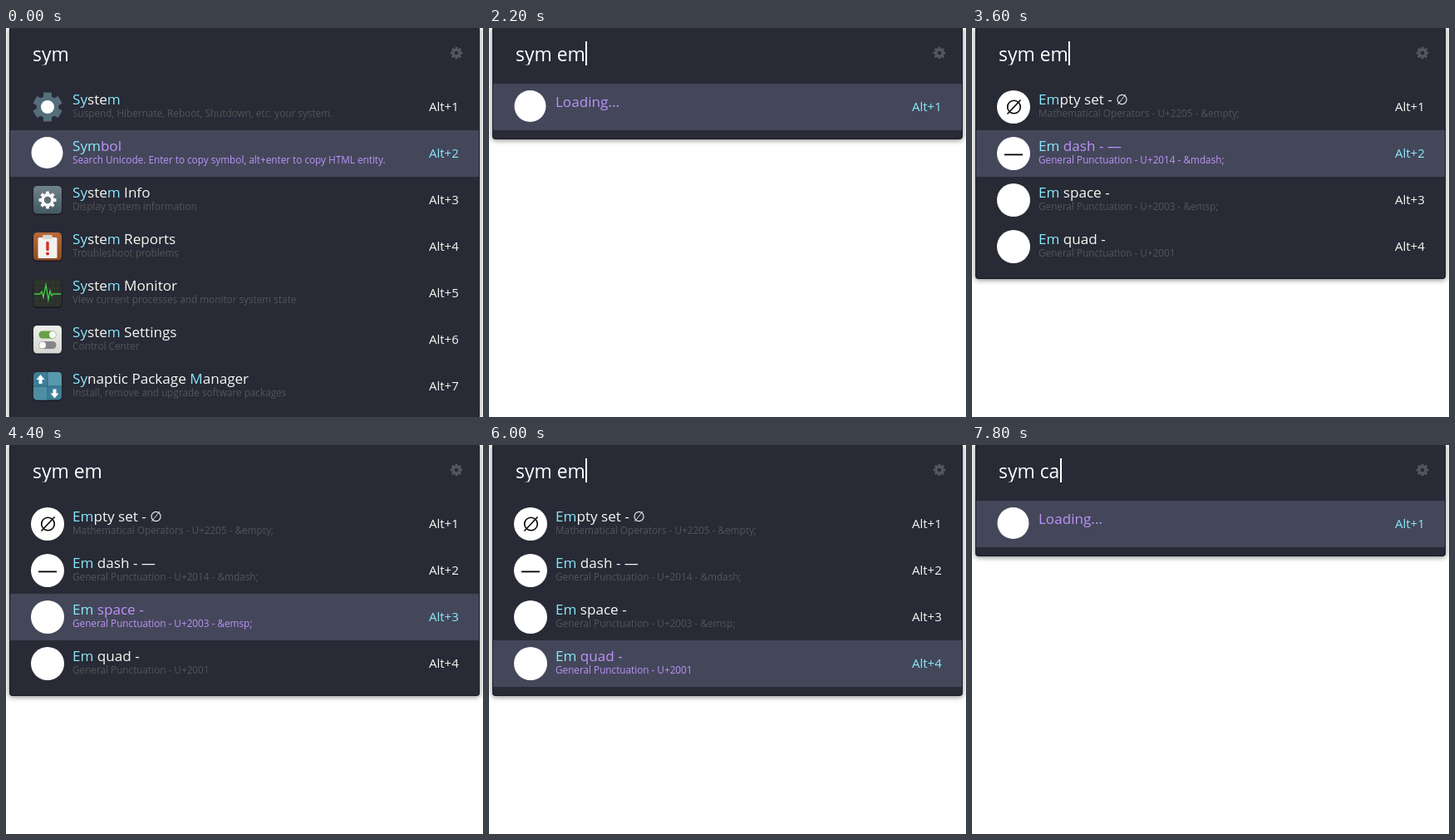
An HTML page with a canvas for the animation above (8 s loop, 574 by 468 pixels).

```html
<!DOCTYPE html>
<html lang="en">
<head>
<meta charset="utf-8">
<title>Launcher search</title>
<style>
  html, body { margin: 0; width: 100%; height: 100%; overflow: hidden; background: #fff; }
  canvas { display: block; }
</style>
</head>
<body>
<canvas id="stage" width="574" height="468"></canvas>
<script>
const ctx = document.getElementById('stage').getContext('2d');
const LOOP = 8000, ROW = 56, TOP = 67;
const FONT = '"Open Sans", "Noto Sans", "DejaVu Sans", sans-serif';
const COLOR = {
  panel: '#282a36', active: '#44475a', edge: '#191a22', text: '#f8f8f2',
  match: '#8be9fd', accent: '#bd93f9', dim: '#555556'
};

// Each track is a list of [start, value]; the last started value holds.
const query = [[0, 'sym'], [1500, 'sym '], [1800, 'sym e'], [1900, 'sym em'],
  [7100, 'sym e'], [7400, 'sym '], [7700, 'sym c'], [7800, 'sym ca']];
const caret = [[0, 0], [300, 1], [1100, 0], [1500, 1], [3200, 0], [3600, 1],
  [4400, 0], [4800, 1], [5600, 0], [6000, 1], [6800, 0], [7100, 1]];
const view = [[0, 'apps'], [2200, 'loading'], [2700, 'symbols'], [7700, 'loading']];
const selected = [[0, 1], [2200, 0], [3500, 1], [4400, 2], [5300, 3], [7700, 0]];
const caretX = { 'sym': 75, 'sym ': 81, 'sym e': 95, 'sym em': 116, 'sym c': 94, 'sym ca': 106 };

// Square brackets mark the matched letters.
const lists = {
  apps: [
    ['[Sy]ste[m]', 'Suspend, Hibernate, Reboot, Shutdown, etc. your system.', hexIcon],
    ['[Sym]bol', 'Search Unicode. Enter to copy symbol, alt+enter to copy HTML entity.', discIcon],
    ['[Sy]ste[m] Info', 'Display system information', infoIcon],
    ['[Sy]ste[m] Reports', 'Troubleshoot problems', reportIcon],
    ['[Sy]ste[m] Monitor', 'View current processes and monitor system state', monitorIcon],
    ['[Sy]ste[m] Settings', 'Control Center', settingsIcon],
    ['[Sy]naptic Package [M]anager', 'Install, remove and upgrade software packages', packageIcon]
  ],
  loading: [['Loading...', '', discIcon]],
  symbols: [
    ['[Em]pty set - ∅', 'Mathematical Operators - U+2205 - &empty;', emptySetIcon],
    ['[Em] dash - —', 'General Punctuation - U+2014 - &mdash;', dashIcon],
    ['[Em] space - \u2003', 'General Punctuation - U+2003 - &emsp;', blankIcon],
    ['[Em] quad - \u2001', 'General Punctuation - U+2001', blankIcon]
  ]
};

function at(track, t) {
  let value = track[0][1];
  for (const [start, v] of track) if (t >= start) value = v;
  return value;
}

function text(str, x, y, size, color) {
  ctx.font = `${size}px ${FONT}`;
  ctx.fillStyle = color;
  ctx.fillText(str, x, y);
  return x + ctx.measureText(str).width;
}

function rect(x, y, w, h, color, r = 0) {
  ctx.fillStyle = color;
  ctx.beginPath();
  ctx.roundRect(x, y, w, h, r);
  ctx.fill();
}

function disc(x, y, r, color) {
  ctx.fillStyle = color;
  ctx.beginPath();
  ctx.arc(x, y, r, 0, Math.PI * 2);
  ctx.fill();
}

function line(points, color, width) {
  ctx.strokeStyle = color;
  ctx.lineWidth = width;
  ctx.beginPath();
  points.forEach(([x, y]) => ctx.lineTo(x, y));
  ctx.stroke();
}

function fade(y0, y1, a, b) {
  const g = ctx.createLinearGradient(0, y0, 0, y1);
  g.addColorStop(0, a);
  g.addColorStop(1, b);
  return g;
}

function gear(x, y, r, teeth, width, color, hole, holeColor) {
  ctx.save();
  ctx.translate(x, y);
  disc(0, 0, r * 0.76, color);
  for (let i = 0; i < teeth; i++) {
    rect(-width / 2, -r, width, r, color, 0.8);
    ctx.rotate(Math.PI * 2 / teeth);
  }
  disc(0, 0, hole, holeColor);
  ctx.restore();
}

function tile(fill) {
  rect(-17.5, -17, 35, 35, 'rgba(0,0,0,.45)', 5);
  rect(-17, -17, 34, 33.5, fill, 4.5);
}

// Icons are drawn around the centre of their slot.
function hexIcon() {
  gear(0, 0, 17.5, 6, 10, '#546e7a', 8, '#fff');
}

function discIcon() {
  disc(-0.5, -1, 19, '#fff');
}

function infoIcon() {
  tile(fade(-17, 17, '#71828a', '#435863'));
  gear(0, 0, 10.5, 8, 4, '#f5f5f5', 4.2, '#5a6d77');
}

function reportIcon() {
  tile(fade(-17, 17, '#b96a3a', '#8c4a24'));
  rect(-11.5, -11, 23, 25, '#f4f2ef', 1.5);
  rect(-6, -14, 12, 5, '#d9d5d0', 1.5);
  rect(-1.7, -6, 3.4, 11, '#d9301f', 1);
  disc(0, 8.6, 2, '#d9301f');
}

function monitorIcon() {
  tile('#2b302b');
  for (let i = -12; i <= 12; i += 6) {
    line([[i, -16], [i, 16]], '#384138', 0.6);
    line([[-16, i], [16, i]], '#384138', 0.6);
  }
  line([[-16, 1], [-9, 1], [-7, -2], [-5, 5], [-2, -10], [1, 8], [3, -3], [5, 3], [7, 1], [16, 1]],
    '#3fd04a', 1.3);
}

function toggle(y, color, knob) {
  rect(-10.5, y - 4.5, 21, 9, color, 4.5);
  disc(knob, y, 4, '#fafafa');
}

function settingsIcon() {
  tile(fade(-17, 17, '#eeeeeb', '#d5d5d0'));
  toggle(-6, '#689f43', 6);
  toggle(6.5, '#858585', -6);
}

function arrow(x, y, dir) {
  ctx.fillStyle = '#fff';
  ctx.beginPath();
  ctx.moveTo(x, y - 6 * dir);
  ctx.lineTo(x + 5, y);
  ctx.lineTo(x - 5, y);
  ctx.fill();
  ctx.fillRect(x - 2, dir > 0 ? y - 0.5 : y - 5, 4, 5.5);
}

function packageIcon() {
  tile('#3d7f98');
  rect(0, -17, 17, 17, '#5799ad', [0, 4.5, 0, 0]);
  rect(-17, 0, 17, 16.5, '#4d8ea4', [0, 0, 0, 4.5]);
  line([[0, -17], [0, 16.5]], '#2d647a', 1);
  line([[-17, 0], [17, 0]], '#2d647a', 1);
  arrow(-8.5, -8, 1);
  arrow(8.5, 8.5, -1);
}

function blankIcon() {
  disc(0, 0, 20, '#fff');
}

function emptySetIcon() {
  blankIcon();
  ctx.strokeStyle = '#000';
  ctx.lineWidth = 1.6;
  ctx.beginPath();
  ctx.arc(0.5, 0, 7.8, 0, Math.PI * 2);
  ctx.stroke();
  line([[-7.5, 8.5], [8.5, -8.5]], '#000', 1.6);
}

function dashIcon() {
  blankIcon();
  rect(-11, 0.5, 22, 1.8, '#000');
}

function drawRow([title, note, icon], i, active) {
  const y = TOP + i * ROW;
  if (active) rect(5, y, 564, ROW, COLOR.active);
  ctx.save();
  ctx.translate(50, y + 28);
  icon();
  ctx.restore();
  let x = 80;
  title.split(/[\[\]]/).forEach((part, k) => {
    const plain = active ? COLOR.accent : COLOR.text;
    x = text(part, x, y + (note ? 25 : 28), 17.1, k % 2 ? COLOR.match : plain);
  });
  text(note, 80, y + 40, 11.75, active ? COLOR.accent : COLOR.dim);
  text('Alt+' + (i + 1), 509, y + 33, 15, active ? COLOR.match : COLOR.text);
}

function drawPanel(rows) {
  const bottom = TOP + rows * ROW + 11;
  ctx.save();
  ctx.shadowColor = 'rgba(0,0,0,.5)';
  ctx.shadowBlur = 6;
  ctx.shadowOffsetY = 1;
  rect(4, -2, 566, bottom + 2, COLOR.edge, 4);
  ctx.restore();
  rect(5, -2, 564, bottom + 1, COLOR.panel, 3.5);
}

function drawInput(str, showCaret) {
  ctx.save();
  ctx.beginPath();
  ctx.rect(28, 10, 480, 34.5);
  ctx.clip();
  text(str, 32, 40, 22.9, '#fff');
  ctx.restore();
  if (showCaret) rect(caretX[str], 16, 2, 29, '#fff');
  gear(542, 30, 7.3, 8, 3, '#54565f', 2.3, COLOR.panel);
}

function draw(t) {
  const rows = lists[at(view, t)];
  const current = at(selected, t);
  ctx.fillStyle = '#fff';
  ctx.fillRect(0, 0, 574, 468);
  drawPanel(rows.length);
  drawInput(at(query, t), at(caret, t));
  rows.forEach((row, i) => drawRow(row, i, i === current));
}

const start = performance.now();
function frame() {
  draw((performance.now() - start) % LOOP);
  requestAnimationFrame(frame);
}
frame();
</script>
</body>
</html>
```
